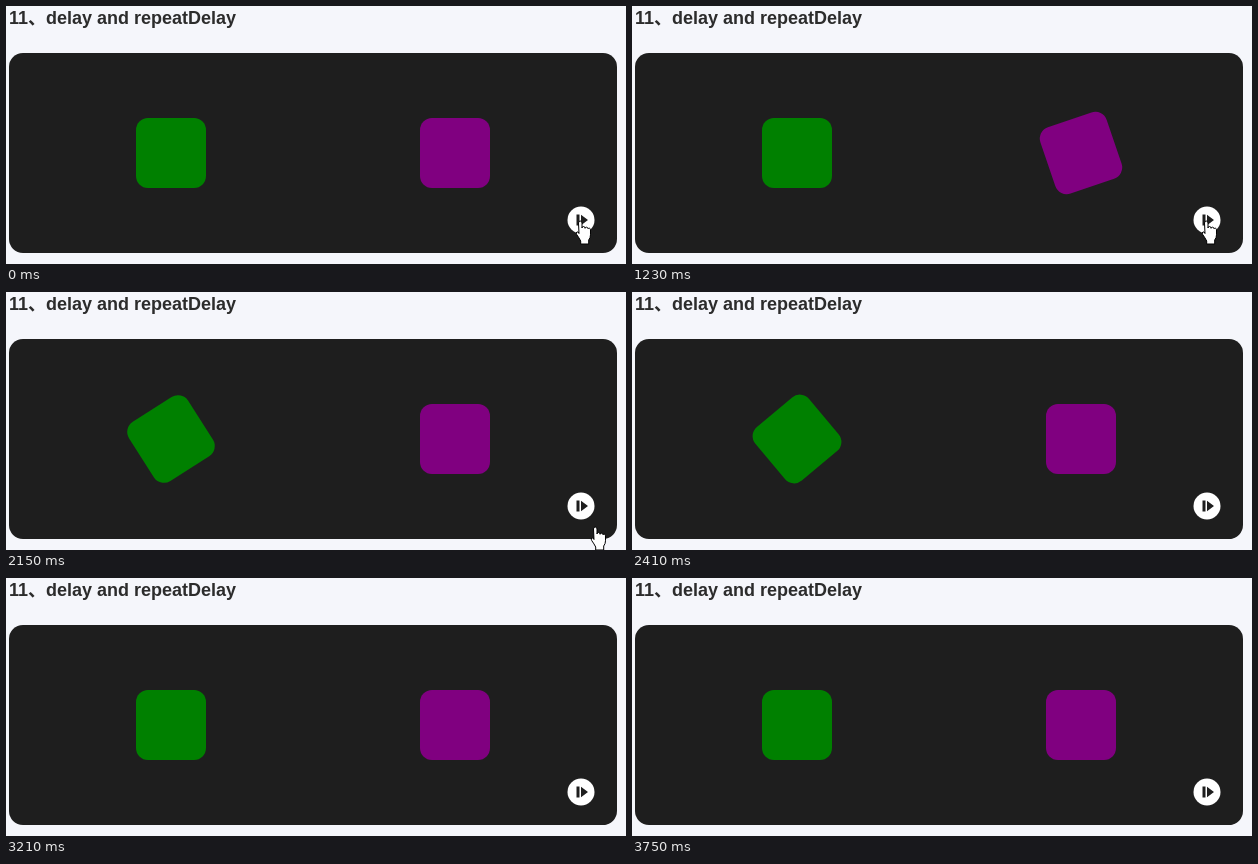
An HTML page for the animation above (4150 ms loop, 620 by 258 pixels).

```html
<!DOCTYPE html>
<html lang="en">
<head>
<meta charset="utf-8">
<title>delay and repeatDelay</title>
<style>
  html, body { margin: 0; width: 100%; height: 100%; overflow: hidden; background: #f5f6fb; }
  svg { display: block; }
  text { font: bold 18px "Liberation Sans", "Noto Sans CJK SC", "Noto Sans CJK", sans-serif; fill: #2c2c2c; }
</style>
</head>
<body>
<svg width="620" height="258" viewBox="0 0 620 258">
  <text y="18"><tspan x="3">11、</tspan><tspan x="40">delay and repeatDelay</tspan></text>
  <rect x="3" y="47" width="608" height="200" rx="14" fill="#1e1e1e"/>
  <rect id="green" x="130" y="112" width="70" height="70" rx="12" fill="#008000"/>
  <rect id="purple" x="414" y="112" width="70" height="70" rx="12" fill="#800080"/>
  <circle cx="575" cy="214" r="13.5" fill="#fff"/>
  <path d="M570.5 208.5h3v11h-3zM575 208.7l7 5.3-7 5.3z" fill="#1e1e1e"/>
  <path id="hand" fill="#fff" stroke="#000" stroke-linejoin="round"
    d="M572.5 217q0-2 1.7-2t1.8 2v5q0-1.5 1.5-1.5t1.6 1.8q.2-1.2 1.5-1.1t1.5 1.6q.3-.8 1.3-.6t1.1 1.6v5q0 3-1.8 5.200v4h-8v-3q-1.500-3-4-6.500-1.200-1.700.2-2.500t2.100 1.500z"/>
</svg>
<script>
  const LOOP = 4150;
  const STEPS = [0, 940, 1090, 1230, 1360, 1490, 1620, 1750, 1880, 2020, 2150, 2280,
    2410, 2550, 2680, 2810, 2940, 3070, 3210, 3340, 3470, 3620, 3750];
  const SECOND_TURN = { start: 2729, duration: 962 };

  const boxes = [
    { id: "purple", x: 449, turns: [{ start: 792, duration: 973 }, SECOND_TURN] },
    { id: "green", x: 165, turns: [{ start: 1717, duration: 1039 }, SECOND_TURN] },
  ].map(box => ({ ...box, node: document.getElementById(box.id) }));
  const hand = document.getElementById("hand");

  const easeOut = x => 1 - (1 - x) ** 2;

  function angleAt(turns, time) {
    const turn = turns.findLast(({ start }) => start <= time);
    return turn ? 360 * easeOut(Math.min(1, (time - turn.start) / turn.duration)) : 0;
  }

  function draw(now) {
    const elapsed = now % LOOP;
    // The picture advances in discrete steps.
    const time = STEPS.findLast(step => step <= elapsed);
    for (const { node, x, turns } of boxes) {
      node.setAttribute("transform", `rotate(${angleAt(turns, time)} ${x} 147)`);
    }
    hand.setAttribute("transform", time < 2150 ? "" : "translate(15 20)");
    hand.setAttribute("visibility", time < 2280 ? "visible" : "hidden");
  }

  const origin = performance.now();
  function tick() {
    draw(performance.now() - origin);
    requestAnimationFrame(tick);
  }
  tick();
</script>
</body>
</html>
```
